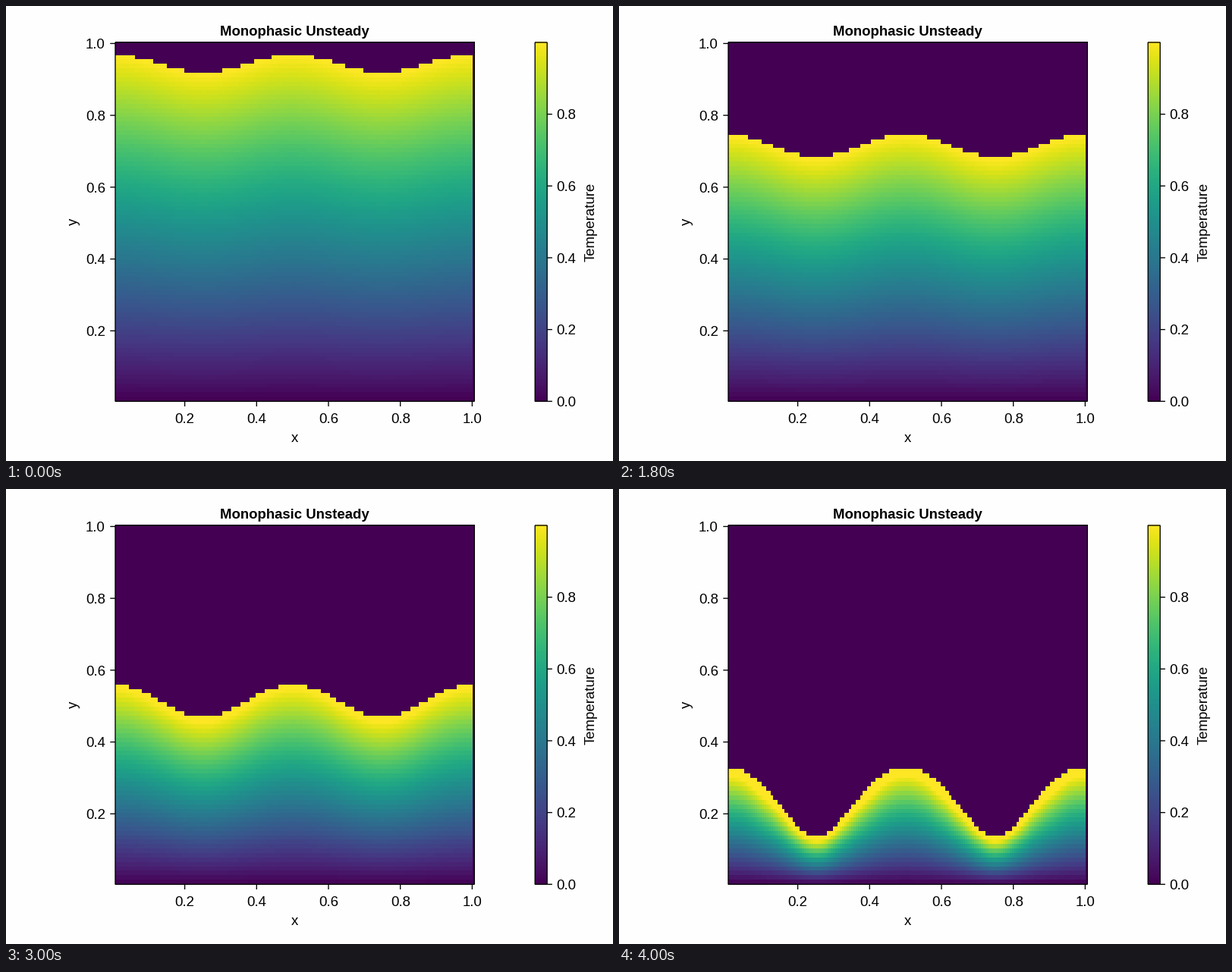
These frames come from a looping animation (800 px wide and 600 px high, 4100 ms). A matplotlib script:

```python
import numpy as np
import matplotlib.pyplot as plt
from matplotlib.animation import FuncAnimation
from matplotlib.patches import Rectangle

W, H, DPI = 800, 600, 100
FRAMES, INTERVAL = 41, 100
PT = 72 / DPI                       # points per pixel
FONT = 14 * 4 / 3 * PT
LINE = 4 / 3 * PT
LEFT, RIGHT, TOP, BOTTOM = 144.0, 617.3, 48.0, 521.3
BAR_LEFT, BAR_RIGHT = 697.2, 713.2
COLS, ROWS = 161, 81

plt.rcParams["font.family"] = "Liberation Sans"

fig = plt.figure(figsize=(W / DPI, H / DPI), dpi=DPI, facecolor="#fefefe")
ax = fig.add_axes([0, 0, 1, 1])
ax.axis("off")

wave = np.cos(4 * np.pi * np.arange(1, COLS + 1) / 160)
start = 76.56 + 1.976 * wave        # initial front height, in rows
rows = np.arange(ROWS)[:, None]

# The squared front height shrinks almost linearly in time.
MELT_TIMES = [0, 6, 14, 22, 30, 34, 40]
MELT_LOSS = [0, 840, 1933, 3023, 4101, 4650, 5440]
MELT_STEP = 136
BEND = 0.06                         # slight upward curve of the profile


def temperature(i):
    """Profile from the cold floor to the front one step ahead of the mask."""
    area = start ** 2 - np.interp(i, MELT_TIMES, MELT_LOSS)
    front = np.sqrt(area)
    ahead = np.maximum(np.sqrt(np.maximum(area - MELT_STEP, 0)), 0.87 * front)
    s = np.minimum((rows + 0.5) / ahead, 1)
    field = np.where(rows < np.floor(front), (s + BEND * s ** 3) / (1 + BEND), 0)
    field[:, -1] = 0
    return field


def heatmap(data, left, right):
    return ax.imshow(data, extent=(left, right, BOTTOM, TOP), origin="lower",
                     cmap="viridis", vmin=0, vmax=1, aspect="auto",
                     interpolation="nearest", zorder=1)


def border(left, right):
    ax.add_patch(Rectangle((left, TOP), right - left, BOTTOM - TOP,
                           fill=False, ec="black", lw=LINE, snap=False,
                           zorder=3))


def tick(xs, ys):
    ax.plot(xs, ys, color="black", lw=LINE, solid_capstyle="butt",
            snap=False, zorder=3)


def label(x, y, text, ha="center", **kw):
    ax.text(x, y, text, ha=ha, va="baseline", fontsize=FONT, color="black",
            rotation_mode="anchor", **kw)


image = heatmap(temperature(0), LEFT, RIGHT)
heatmap(np.linspace(0, 1, 256)[:, None], BAR_LEFT, BAR_RIGHT)
border(LEFT, RIGHT)
border(BAR_LEFT, BAR_RIGHT)

for k in range(1, 6):
    name = f"{k / 5:.1f}"
    x = 140.9 + 94.7 * k
    y = 523.1 - 94.73 * k
    tick([x, x], [BOTTOM, BOTTOM + 6.7])
    label(x, 550, name)
    tick([LEFT - 6.7, LEFT], [y, y])
    label(131, y + 6.7, name, ha="right")

for k in range(5):
    y = BOTTOM - 94.66 * k
    tick([BAR_RIGHT, BAR_RIGHT + 6.7], [y, y])
    label(725.2, y + 6.7, f"{k / 5:.1f}", ha="left")

label(380.6, 38.7, "Monophasic Unsteady", weight="bold")
label(380.6, 574.7, "x")
label(94, 284.7, "y", rotation=90)
label(775.5, 284.7, "Temperature", rotation=90)

ax.set_xlim(0, W)
ax.set_ylim(H, 0)


def update(i):
    image.set_data(temperature(i))
    return [image]


anim = FuncAnimation(fig, update, frames=FRAMES, interval=INTERVAL,
                     repeat=True, repeat_delay=0, blit=False)
plt.show()
```
